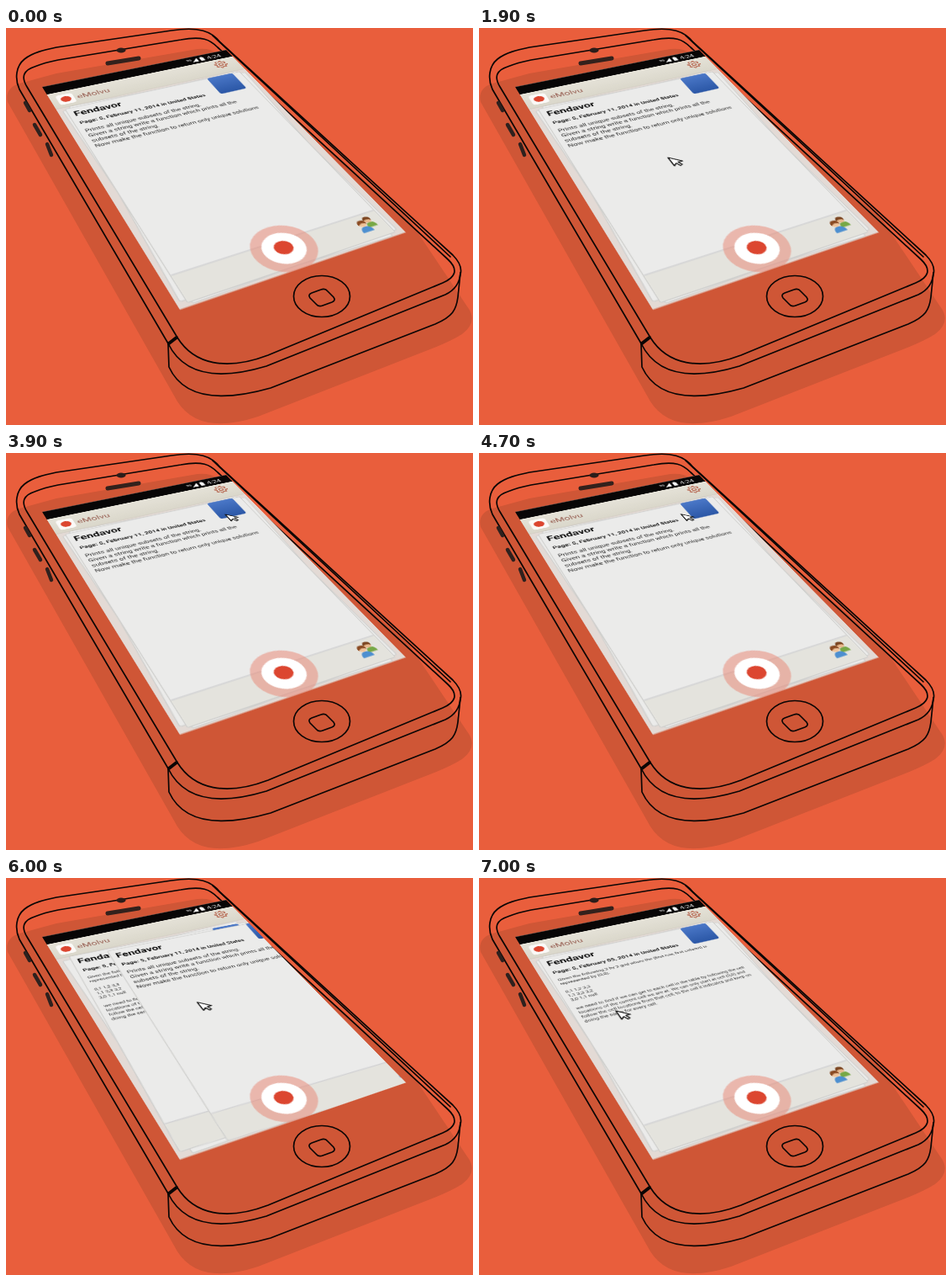
Write an HTML page that moves like this. It is 556x472 px and loops after 7100 ms.

```html
<!DOCTYPE html>
<html lang="en">
<head>
<meta charset="utf-8">
<title>Phone card demo</title>
<style>
  html, body { margin: 0; width: 100%; height: 100%; overflow: hidden; background: #e95e3c; }
  svg { display: block; position: absolute; left: 0; top: 0; }
  #screen { transform-origin: 0 0; }
  text { font-family: Roboto, "Open Sans", sans-serif; white-space: pre; }
</style>
</head>
<body>
<svg id="stage" width="556" height="472" viewBox="0 0 556 472">
  <rect width="556" height="472" fill="#e95e3c"/>
  <path fill="#cf5636" d="M2 88Q-2 72 16 66L60 54L222 26Q240 22 252 30L350 113L480 228L549 331Q563 349 543 364Q530 372 510 380L300 462Q230 485 204 444Z"/>
  <g fill="none" stroke="#0b0605" stroke-width="1.7" stroke-linecap="round" stroke-linejoin="round">
    <path d="M193 375L16 73C10 60 12 45 22 37C32 29 46 26 60 23L197 3C230 -2 245 4 255 17L532 270Q544 282 541 293"/>
    <path d="M204 368L25 70C17 57 22 50 34 46C44 42 52 40 62 38L208 14C234 9 243 14 252 23L526 275C540 288 534 297 520 303L312 389C262 408 224 400 204 368"/>
    <path d="M246 9L529 272"/>
    <path d="M193 375C211 412 250 420 310 402L523 317Q540 309 541 291"/>
    <path d="M193 375L194 403C211 440 255 445 315 428L511 352C532 343 536 335 538 320L541 291"/>
    <path d="M194 375L203 368" stroke-width="4"/>
    <path d="M23 89l5 9M34 115l7 12M49 138l5 13" stroke="#2e211e" stroke-width="4.5"/>
    <ellipse cx="376" cy="319" rx="33.5" ry="24.5"/>
    <path d="M364 315L375 311Q380 309 383 313L390 320Q393 324 388 326L377 330Q372 332 369 328L362 321Q359 317 364 315Z"/>
    <path d="M121 42L158 36" stroke="#33211c" stroke-width="5"/>
  </g>
  <ellipse cx="137" cy="26.5" rx="5.5" ry="3" fill="#2b1d1a"/>
</svg>
<svg id="screen" width="276" height="343" viewBox="-4 -4 368 588" preserveAspectRatio="none">
  <defs>
    <linearGradient id="head" x2="0" y2="1">
      <stop offset="0" stop-color="#e5e2d8"/><stop offset="1" stop-color="#dad7ca"/>
    </linearGradient>
    <linearGradient id="blue" x2="0" y2="1">
      <stop offset="0" stop-color="#4b78c8"/><stop offset="1" stop-color="#2b57a6"/>
    </linearGradient>
    <clipPath id="glass"><rect width="360" height="580"/></clipPath>
  </defs>
  <g clip-path="url(#glass)">
    <rect width="360" height="580" fill="#e3dad5"/>
    <g id="stack"></g>
    <g id="next"></g>
    <g id="top"></g>
    <rect y="27" width="360" height="50" fill="url(#head)"/>
    <rect y="76" width="360" height="1.5" fill="#cbc8be"/>
    <rect x="11" y="37" width="29" height="31" rx="6" fill="#fbf9f7"/>
    <circle cx="25.5" cy="52.5" r="9" fill="#dc4630"/>
    <text x="45" y="59" font-size="18" fill="#94594c">eMolvu</text>
    <g id="gear" fill="none" stroke="#b5624b" stroke-width="2" transform="translate(326 46)"></g>
    <rect width="360" height="27" fill="#080606"/>
    <g fill="#f2f2f2">
      <text x="271" y="14" font-size="8" font-weight="700">3G</text>
      <path d="M281 20L293 20L293 7Z"/>
      <path d="M298 9h2v-2h4v2h2v12h-8Z"/>
      <text x="312" y="20" font-size="15">4:24</text>
    </g>
    <circle cx="180" cy="535" r="48" fill="#ea8473" fill-opacity=".5"/>
    <circle cx="180" cy="535" r="32" fill="#fff"/>
    <circle cx="180" cy="534" r="14" fill="#dc4630"/>
    <path id="cursor" d="M0 0V17L4 13.2L6.6 19.2L9.3 18L6.8 12.2H12.2Z" fill="#fff" stroke="#111" stroke-width="1.5" stroke-linejoin="round"/>
  </g>
</svg>
<script>
const W = 360, H = 580, PAD = 4, LOOP = 7100, STEP = 100;
const $ = id => document.getElementById(id);

// Perspective from the flat screen to the tilted phone
const [[x0, y0], [x1, y1], [x2, y2], [x3, y3]] = [[43, 70], [262, 26], [476, 243], [207, 335]];
const sx = x0 - x1 + x2 - x3, sy = y0 - y1 + y2 - y3;
const den = (x1 - x2) * (y3 - y2) - (x3 - x2) * (y1 - y2);
const g = (sx * (y3 - y2) - (x3 - x2) * sy) / den;
const h = ((x1 - x2) * sy - sx * (y1 - y2)) / den;
const a = x1 - x0 + g * x1, b = x3 - x0 + h * x3;
const d = y1 - y0 + g * y1, e = y3 - y0 + h * y3;
const matrix = [a / W, d / W, 0, g / W, b / H, e / H, 0, h / H, 0, 0, 1, 0, x0, y0, 0, 1];

// The layer is laid out near its displayed size, with a clear margin for smooth edges
const box = $('screen');
box.style.transform = `matrix3d(${matrix.map(n => n.toFixed(9))}) translate(${-PAD}px, ${-PAD}px)
  scale(${(W + 2 * PAD) / box.getAttribute('width')}, ${(H + 2 * PAD) / box.getAttribute('height')})`;

function toFlat(x, y) {
  const A = a - g * x, B = b - h * x, C = d - g * y, D = e - h * y, k = A * D - B * C;
  return [W * ((x - x0) * D - B * (y - y0)) / k, H * (A * (y - y0) - C * (x - x0)) / k];
}

const sheet = '<rect x="14" y="83" width="332" height="490" rx="3" fill="#ebebea" stroke="#cfcfcd" stroke-width="1.6"/>';

const people = `<g transform="translate(317 540)">
  <path d="M-1 9Q-1 -2 7 -2Q15 -2 15 9Z" fill="#77a846"/>
  <circle cx="6" cy="-7" r="6" fill="#eab98c"/><path d="M-1 -6Q0 -15 7 -14Q14 -13 12 -5Q7 -11 -1 -6Z" fill="#7a4420"/>
  <path d="M-15 16Q-15 4 -6 4Q4 4 4 16Z" fill="#4d8fd0"/>
  <circle cx="-6" cy="-2" r="6.5" fill="#efc39a"/><path d="M-13 0Q-14 -10 -6 -10Q2 -10 1 0Q-5 -7 -13 0Z" fill="#8a4a22"/>
</g>`;

function card(date, size, first, pitch, lines) {
  const body = lines.map((s, i) =>
    `<text x="23.5" y="${first + i * pitch}" font-size="${size}" fill="#262626">${s}</text>`).join('');
  return `${sheet}
    <rect x="15" y="519" width="330" height="53" fill="#e4e3dd"/>
    <rect x="15" y="517.5" width="330" height="2" fill="#d0d0d2"/>
    <text x="23" y="109" font-size="20" font-weight="700" fill="#0c0c0c">Fendavor</text>
    <text x="23" y="135" font-size="11.8" font-weight="700" fill="#1c1c1c">Page: 5, February ${date}, 2014 in United States</text>
    ${body}
    <rect x="279" y="82" width="52" height="57" rx="5" fill="url(#blue)"/>
    ${people}`;
}

$('stack').innerHTML = [2, -1.3].map(r => `<g transform="rotate(${r} 180 330)">${sheet}</g>`).join('');
$('top').innerHTML = card('11', 12.4, 160, 15.4, [
  'Prints all unique subsets of the string.',
  'Given a string write a function which prints all the',
  'subsets of the string.',
  'Now make the function to return only unique solutions'
]);
$('next').innerHTML = card('05', 9.4, 157, 12.1, [
  'Given the following 3 by 3 grid where the (first row, first column) is',
  'represented by (0,0).', '',
  '0,1 1,2 3,3', '1,1 3,3 3,2', '3,0 1,1 null', '',
  'we need to find if we can get to each cell in the table by following the cell',
  'locations of the current cell we are at. We can only start at cell (0,0) and',
  'follow the cell locations from that cell, to the cell it indicates and keep on',
  'doing the same for every cell.'
]);

// Gear outline with eight teeth
const teeth = Array.from({ length: 32 }, (_, i) => {
  const r = i % 4 < 2 ? 12 : 8.5, t = (i + .5) * Math.PI / 16;
  return (r * Math.cos(t)).toFixed(1) + ' ' + (r * Math.sin(t)).toFixed(1);
});
$('gear').innerHTML = `<path d="M${teeth.join('L')}Z"/><circle r="4"/>`;

// Linear keyframes: [time, ...values]
function at(keys, t) {
  let i = 1;
  while (i < keys.length - 1 && keys[i][0] < t) i++;
  const p = keys[i - 1], q = keys[i];
  const k = Math.min(1, Math.max(0, (t - p[0]) / (q[0] - p[0])));
  return p.slice(1).map((v, j) => v + (q[j + 1] - v) * k);
}

const pointer = [
  [100, 450, 216], [800, 305, 192], [1000, 288, 183], [1100, 288, 183], [1300, 292, 173],
  [1900, 225, 154], [2300, 202, 149], [2600, 212, 147], [2700, 217, 142], [3500, 253, 77],
  [3600, 255, 78], [3800, 255, 78], [3900, 261, 73], [4200, 262, 63], [4650, 246, 66],
  [5300, 174, 153], [5400, 173, 155], [5800, 173, 155], [6100, 255, 144], [6400, 347, 131],
  [6600, 300, 138], [7000, 163, 158]
];
// Swiped card: shift x, shift y, turn
const swipe = [[5800, 0, 0, 0], [6000, 65, 8, 2], [6200, 180, 24, 6], [6400, 430, 50, 12]];
const settle = [[6400, 2], [6900, 0]];

function draw(ms) {
  const t = Math.floor(ms % LOOP / STEP) * STEP;
  const [px, py] = at(pointer, t), [fx, fy] = toFlat(px, py);
  $('cursor').setAttribute('transform', `translate(${fx} ${fy}) scale(1.4)`);
  $('cursor').style.display = t < 100 ? 'none' : '';
  const [dx, dy, turn] = at(swipe, t);
  $('top').setAttribute('transform', `translate(${dx} ${dy}) rotate(${turn} 180 330)`);
  $('top').style.display = t < 6400 ? '' : 'none';
  $('next').setAttribute('transform', `rotate(${at(settle, t)[0]} 180 330)`);
  $('next').style.display = t > 5800 ? '' : 'none';
}

const start = performance.now();
function loop(now) {
  draw(Math.max(0, now - start));
  requestAnimationFrame(loop);
}
draw(0);
requestAnimationFrame(loop);
</script>
</body>
</html>
```
